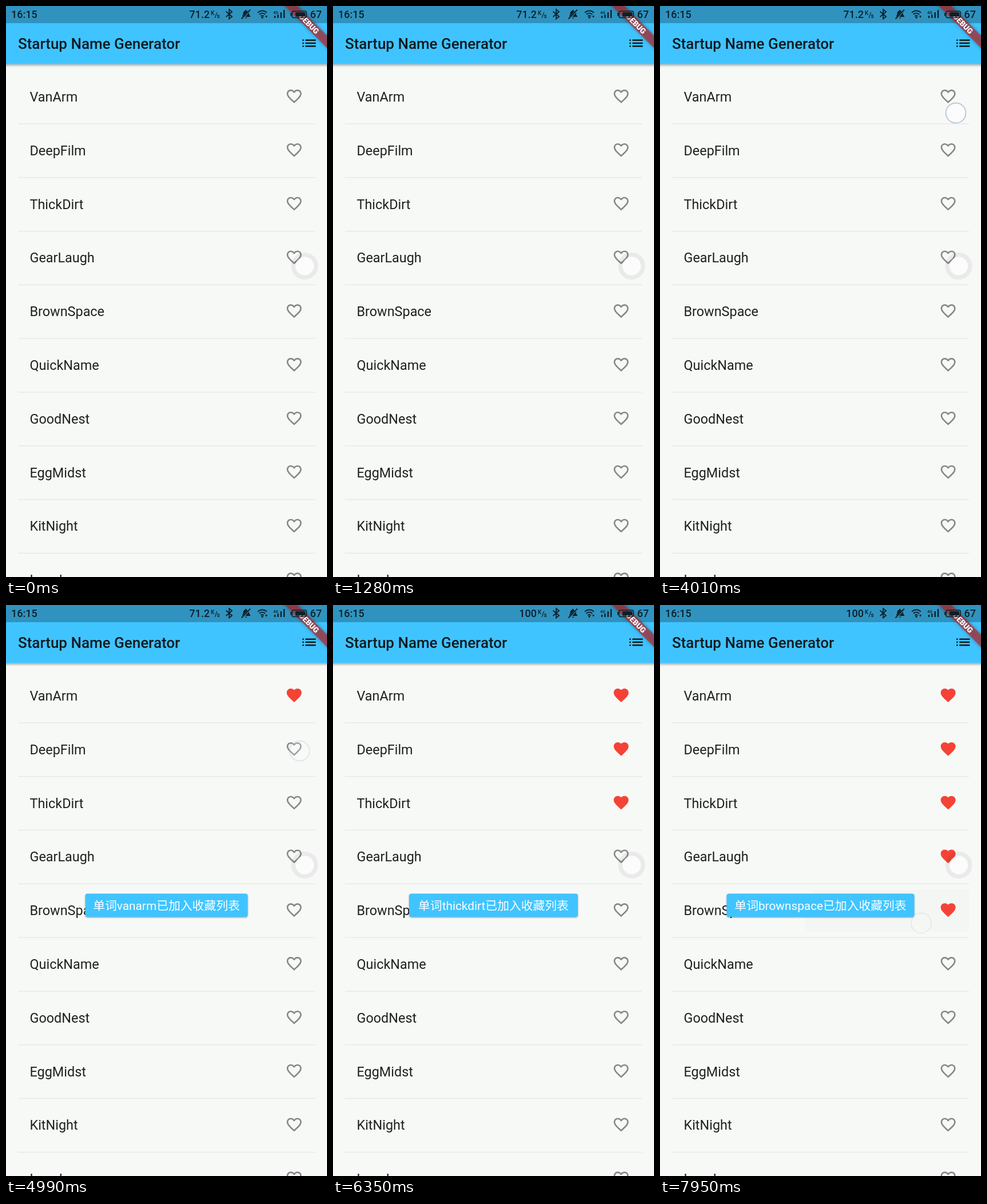
Write an HTML page that moves like this. It is 561x998 px and loops after 8 s.

```html
<!DOCTYPE html>
<html lang="zh-CN">
<head>
<meta charset="utf-8">
<title>Startup Name Generator</title>
<style>
  html, body { margin: 0; width: 100%; height: 100%; overflow: hidden; background: #f7f9f7; }
  svg { display: block; width: 561px; height: 998px; font-family: Roboto, "Noto Sans CJK SC", "Noto Sans CJK", sans-serif; }
  .status { font-size: 18px; font-weight: 500; fill: #0c2029; }
  .title { font-size: 26px; font-weight: 500; fill: #101a20; }
  .name { font-size: 23.4px; fill: #1f211f; }
  .toast text { font-size: 20.8px; fill: #fff; text-anchor: middle; }
  .toast rect { fill: #40c4ff; }
</style>
</head>
<body>
<svg viewBox="0 0 561 998">
  <defs>
    <filter id="barShadow" x="-5%" y="-20%" width="110%" height="150%">
      <feDropShadow dx="0" dy="2" stdDeviation="2.2" flood-opacity=".38"/>
    </filter>
    <filter id="toastShadow" x="-5%" y="-20%" width="110%" height="150%">
      <feDropShadow dx="0" dy="1.2" stdDeviation="1.1" flood-opacity=".4"/>
    </filter>
    <filter id="bannerShadow" x="-20%" y="-60%" width="140%" height="220%">
      <feDropShadow dx="0" dy="0" stdDeviation="3" flood-opacity=".45"/>
    </filter>
  </defs>
  <rect width="561" height="998" fill="#f7f9f7"/>
  <g id="ripples"></g>
  <g id="rows"></g>

  <rect x="-10" y="-10" width="581" height="111.5" fill="#40c4ff" filter="url(#barShadow)"/>
  <rect width="561" height="30" fill="#3093bf"/>
  <text class="title" x="21" y="75">Startup Name Generator</text>
  <path transform="translate(514.1 49.4) scale(1.3)" fill="#10181c"
    d="M3 13h2v-2H3zM3 17h2v-2H3zM3 9h2V7H3zM7 13h14v-2H7zM7 17h14v-2H7zM7 7v2h14V7z"/>

  <g transform="translate(561 0) rotate(45)">
    <rect x="-56" y="36.4" width="112" height="15.6" fill="#b71c1c" fill-opacity=".63" filter="url(#bannerShadow)"/>
    <text y="49" text-anchor="middle" font-size="13.3" font-weight="900" fill="#fff">DEBUG</text>
  </g>

  <g class="status">
    <text x="9" y="21">16:15</text>
    <text id="speed" x="356" y="21" text-anchor="end"></text>
    <text x="358" y="16" font-size="10">K</text>
    <text x="364.5" y="20" font-size="13">/</text>
    <text x="368.5" y="21" font-size="10">s</text>
    <text x="531.5" y="21">67</text>
    <text x="467" y="14" font-size="7">4G</text>
  </g>
  <g fill="none" stroke="#0c2029" stroke-width="1.8">
    <path d="M384.5 9.5L395 18.5L390 22.5V6L395 10L384.5 19"/>
    <path d="M440 11.5q8-6.5 16 0M442.7 14.8q5.3-4.3 10.6 0M445.3 18q2.7-2 5.4 0"/>
    <path d="M470 21v-4M475.3 21v-6M480.7 21v-10M486 21v-14" stroke-width="2.4"/>
    <rect x="500" y="9" width="25" height="11.5" rx="2.5" stroke-width="1.6"/>
    <path d="M498 12v5.5"/>
    <path d="M411.5 22.5L427 6.5"/>
  </g>
  <g fill="#0c2029">
    <circle cx="448" cy="20.3" r="1.6"/>
    <path d="M453 17h4l-2 4z"/>
    <rect x="506" y="11" width="17" height="7.5" rx="1"/>
    <path d="M413 18.5V17l1.5-2V12.500q.5-4 4-4.500v-1.500h1.600v1.500l2.500 1.300L413.800 18.500zM425 11.500v4l2 2v1.500h-9zM417.500 20.500h4q-2 3-4 0z"/>
  </g>

  <g id="toasts"></g>
  <circle cx="522" cy="454.500" r="19.800" fill="none" stroke="#000" stroke-opacity=".058" stroke-width="7.500"/>
  <circle cx="522" cy="454.500" r="16" fill="#fff" fill-opacity=".6"/>
  <g id="touch">
    <circle r="17.500" fill="#fff" fill-opacity=".5" stroke="#bccbd9" stroke-width="2"/>
  </g>
</svg>
<script>
const LOOP = 8000, PITCH = 93.8, SPEED_CHANGE = 5200;
const NAMES = ["VanArm", "DeepFilm", "ThickDirt", "GearLaugh", "BrownSpace",
  "QuickName", "GoodNest", "EggMidst", "KitNight", "LoneLaw"];
const HEART = "M12 21.35l-1.45-1.32C5.4 15.36 2 12.28 2 8.5 2 5.42 4.42 3 7.5 3c1.74 0 3.41.81 4.5 2.09C13.09 3.81 14.76 3 16.5 3 19.58 3 22 5.42 22 8.5c0 3.78-3.4 6.86-8.55 11.54z";
const HOLLOW = "M12.1 18.55l-.1.1-.1-.1C7.14 14.24 4 11.39 4 8.5 4 6.5 5.5 5 7.5 5c1.54 0 3.04.99 3.57 2.36h1.87C13.46 5.99 14.96 5 16.5 5c2 0 3.5 1.5 3.5 3.5 0 2.89-3.14 5.74-7.9 10.05z";

// One tap per row, from the top: release time, finger position, toast width.
const TAPS = [
  { at: 4070, x: 517, y: 187, width: 284 },
  { at: 5080, x: 513, y: 255, width: 297 },
  { at: 6030, x: 510, y: 358, width: 295 },
  { at: 6860, x: 485, y: 458, width: 308 },
  { at: 7790, x: 456.5, y: 556, width: 328 }
];

const byId = id => document.getElementById(id);
const ramp = (t, from, to) => Math.min(1, Math.max(0, (t - from) / (to - from)));

function add(parent, tag, attrs, text) {
  const node = document.createElementNS("http://www.w3.org/2000/svg", tag);
  for (const key in attrs) node.setAttribute(key, attrs[key]);
  if (text) node.textContent = text;
  return parent.appendChild(node);
}

const hearts = NAMES.map((name, i) => {
  const row = add(byId("rows"), "g", { transform: `translate(0 ${i * PITCH})` });
  add(row, "text", { class: "name", x: 41.5, y: 167 }, name);
  add(row, "rect", { x: 21, y: 205.3, width: 519, height: 1.3, fill: "#000", "fill-opacity": 0.075 });
  return add(row, "path", { transform: "translate(488 142.2) scale(1.3)", "fill-rule": "evenodd" });
});

TAPS.forEach((tap, i) => {
  const clip = add(document.querySelector("defs"), "clipPath", { id: "tile" + i });
  add(clip, "rect", { x: 21, y: 122 + i * PITCH, width: 519, height: 73.5 });
  tap.ripple = add(byId("ripples"), "circle",
    { cx: tap.x, cy: tap.y, fill: "#c8c8c8", "clip-path": `url(#tile${i})` });

  tap.toast = add(byId("toasts"), "g", { class: "toast" });
  add(tap.toast, "rect", { x: 280.5 - tap.width / 2, y: 504.5, width: tap.width, height: 40.5,
    rx: 4, filter: "url(#toastShadow)" });
  add(tap.toast, "text", { x: 280.5, y: 532.5 }, `单词${NAMES[i].toLowerCase()}已加入收藏列表`);
});

function render(t) {
  hearts.forEach((heart, i) => {
    const liked = i < TAPS.length && t >= TAPS[i].at;
    heart.setAttribute("d", liked ? HEART : HEART + HOLLOW);
    heart.setAttribute("fill", liked ? "#f44336" : "#868886");
  });

  let touchOpacity = 0;
  TAPS.forEach((tap, i) => {
    const age = t - tap.at, next = TAPS[i + 1];
    tap.ripple.setAttribute("r", Math.max(0, age * 1.25));
    tap.ripple.setAttribute("opacity", age < 0 ? 0 : 0.4 * (1 - ramp(age, 0, 200)));

    const leaving = next ? ramp(t, next.at, next.at + 170) : 0;
    tap.toast.setAttribute("opacity", ramp(age, 20, 140) * (1 - leaving));

    const pressed = ramp(age, -110, -60) * (1 - ramp(age, 60, 200));
    if (pressed > 0) {
      touchOpacity = pressed;
      byId("touch").setAttribute("transform", `translate(${tap.x} ${tap.y})`);
    }
  });
  byId("touch").setAttribute("opacity", touchOpacity);
  byId("speed").textContent = t < SPEED_CHANGE ? "71.2" : "100";
}

const start = performance.now();
function tick() {
  render((performance.now() - start) % LOOP);
  requestAnimationFrame(tick);
}
tick();
</script>
</body>
</html>
```
